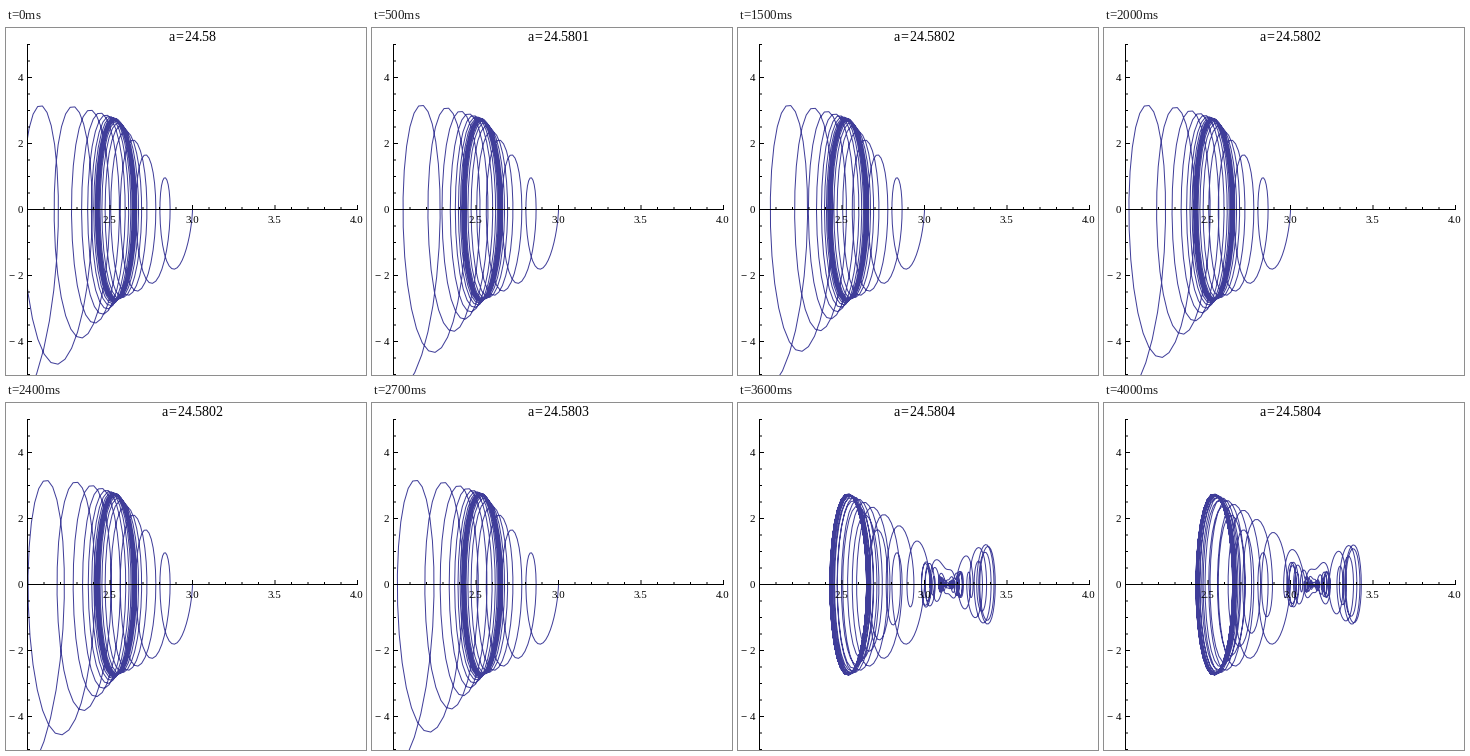
Recreate the animation shown at these times as a matplotlib script. Size 360 px wide and 347 px high, loop 4100 ms.

```python
import math

import numpy as np
import matplotlib.pyplot as plt
from matplotlib.animation import FuncAnimation
from matplotlib.patches import Rectangle

# Phase portrait of a damped pendulum whose pivot shakes vertically at frequency a.
W, H, DPI = 360, 347, 100
PX = 72 / DPI
FRAMES, INTERVAL = 41, 100
GRAVITY, SHAKE = 9.8, 0.2
A_START, A_STEP = 24.58, 1e-5
A_CRITICAL = 24.5803175  # below it the pendulum tips over, above it stays up
T_END = 20.0
STEPS, KEEP = 84, 3  # integration steps per shake, every KEEP-th is drawn
THIN = r"$\hspace{0.08}$"


def orbit(a, damping):
    """Yield (angle, velocity) from rest at angle 3, integrated with RK4."""
    h = 2 * math.pi / a / STEPS
    kick = SHAKE * a * a
    force = [GRAVITY + kick * math.sin(math.pi * i / STEPS)
             for i in range(2 * STEPS + 1)]
    sin = math.sin
    x, v = 3.0, 0.0
    yield x, v
    for n in range(int(T_END / h)):
        i = 2 * (n % STEPS)
        f0, f1, f2 = force[i:i + 3]
        a1 = -f0 * sin(x) - damping * v
        v2 = v + h / 2 * a1
        a2 = -f1 * sin(x + h / 2 * v) - damping * v2
        v3 = v + h / 2 * a2
        a3 = -f1 * sin(x + h / 2 * v2) - damping * v3
        v4 = v + h * a3
        a4 = -f2 * sin(x + h * v3) - damping * v4
        x += h / 6 * (v + 2 * v2 + 2 * v3 + v4)
        v += h / 6 * (a1 + 2 * a2 + 2 * a3 + a4)
        yield x, v
        if x < 1:
            return


def tips_over(a, damping):
    for x, _ in orbit(a, damping):
        if x < 1.7:
            return True
        if x > 3.1:
            return False
    return False


def tune_damping(low=0.1, high=1.2):
    """Find the damping for which A_CRITICAL separates the two outcomes."""
    for _ in range(40):
        mid = (low + high) / 2
        if tips_over(A_CRITICAL, mid):
            low = mid
        else:
            high = mid
    return (low + high) / 2


def to_x(angle):
    return 21.5 + 165 * (angle - 2)


def to_y(velocity):
    return 181.5 - 33 * velocity


DAMPING = tune_damping()
curves = []
for k in range(FRAMES):
    path = np.array(list(orbit(A_START + A_STEP * k, DAMPING)))[::KEEP]
    curves.append((to_x(path[:, 0]), to_y(path[:, 1])))

fig = plt.figure(figsize=(W / DPI, H / DPI), dpi=DPI, facecolor="white")
ax = fig.add_axes([0, 0, 1, 1])
ax.set_xlim(0, W)
ax.set_ylim(H, 0)
ax.axis("off")


def rule(x0, y0, x1, y1):
    ax.plot([x0, x1], [y0, y1], color="black", lw=PX, snap=False,
            solid_capstyle="butt", zorder=3)


def label(x, y, text, size, ha):
    return ax.text(x, y, text, family="Liberation Serif", fontsize=size * PX,
                   ha=ha, va="baseline", color="black", zorder=4)


rule(21, 181.5, 352, 181.5)
rule(21.5, 16, 21.5, 347)
for i in range(21):
    major = i % 5 == 0
    x = to_x(2 + i / 10)
    rule(x, 181, x, 177 if major else 179)
    if major and i:
        label(x - 0.5, 195, f"{2 + i / 10:.1f}", 11, "center")
for i in range(-10, 11):
    major = i % 4 == 0
    y = to_y(i / 2)
    rule(22, y, 26 if major else 24, y)
    if major:
        sign = "\u2212 " if i < 0 else ""
        label(17.5, y + 3.7, f"{sign}{abs(i) // 2}", 11, "right")

title = label(186.5, 13, "", 14, "center")
curve, = ax.plot([], [], color=(0.2472, 0.24, 0.6), lw=PX, zorder=2)
curve.set_clip_path(Rectangle((21, 16), 331, 331, transform=ax.transData))


def draw(k):
    a = A_START + 1e-4 * ((k + 5) // 10)
    title.set_text(f"a{THIN}={THIN}" + f"{a:.4f}".rstrip("0"))
    curve.set_data(*curves[k])
    return curve, title


anim = FuncAnimation(fig, draw, frames=FRAMES, interval=INTERVAL,
                     repeat=True, repeat_delay=0)
plt.show()
```
